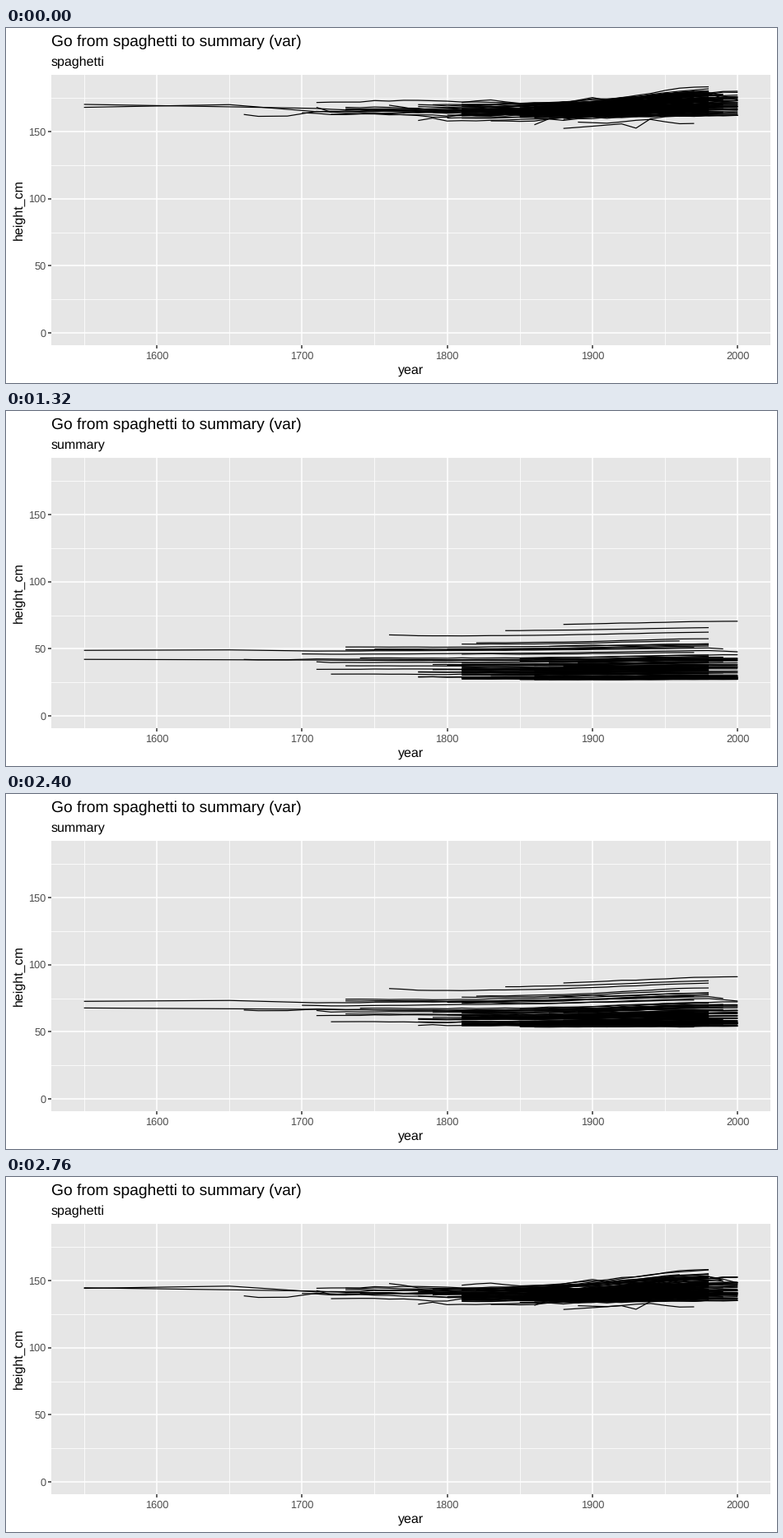
Animation of 936 by 432 pixels, one loop 2880 ms. Source, as a matplotlib script:

```python
import numpy as np
import matplotlib.pyplot as plt
from matplotlib.animation import FuncAnimation
from matplotlib.collections import LineCollection

W, H, DPI = 936, 432, 72          # at 72 dpi one point is one pixel
LEFT, RIGHT, TOP, BOTTOM = 55, 928, 57, 386
STEP_MS, FRAMES = 120, 24
HOLD, STEPS = 6, 6                # last still frame, steps per transition

plt.rcParams.update({
    "font.family": "Liberation Sans",
    "text.hinting": "none",
    "path.simplify": False,
})
rng = np.random.default_rng(12)

# start year, end year, variance, first height, last height
TRENDS = [
    (1880, 2000, 50, 159, 173),
    (1840, 1980, 43.5, 163.6, 177),
    (1810, 1960, 31.2, 165, 179),
    (1730, 1980, 28.4, 166, 180),
    (1750, 1980, 26.6, 166, 179),
    (1730, 1970, 25.5, 168, 178),
    (1740, 1980, 18.8, 165, 178),
    (1730, 1980, 11.4, 167, 173),
    (1720, 1990, 4.8, 162.8, 168),
    (1830, 1980, 3.6, 157.9, 164),
]

# variance, then (year, height) knots
TALL = [
    (38.5, (1760, 169.6), (1780, 165.8), (1810, 165), (1980, 181.8)),
    (32.3, (1820, 165), (1900, 171), (1960, 182.3), (1980, 183.3)),
    (28.3, (1870, 169), (1900, 175.3), (1910, 173.2), (1980, 180.3)),
    (20.9, (1810, 171.6), (1830, 173.5), (1850, 171), (1970, 179)),
    (7.3, (1710, 171.6), (1780, 173.2), (1850, 170.8), (1980, 174)),
]
LONG = [
    (25, (1550, 168), (1650, 170), (1710, 164.8), (1980, 178.5),
     (1990, 174.5)),
    (16.5, (1550, 170.2), (1650, 168.4), (1780, 165), (2000, 175)),
    (22.6, (1700, 164), (1720, 162.6), (1980, 179), (2000, 173.4)),
    (17.9, (1660, 162.7), (1670, 161.3), (1690, 161.5), (1710, 165),
     (1800, 161.5), (1990, 173)),
    (14.8, (1710, 168), (1720, 164.5), (2000, 174)),
]
LOW = [
    (3, (1780, 158.2), (1790, 160), (1800, 157.8), (1980, 165)),
    (14, (1860, 155), (1870, 159.4), (1980, 168)),
    (9, (1880, 152.3), (1920, 155.7), (1930, 152.5), (1940, 159.5),
     (1980, 163)),
    (2.4, (1890, 157), (1910, 156.2), (1940, 159), (1960, 155.8),
     (1970, 156)),
]


def growth(year):
    return 1 / (1 + np.exp((1925 - year) / 28))


def trend(start, end, var, first, last):
    """Heights by decade: flat at first, then rising through the 1900s."""
    year = np.arange(start, end + 1, 10)
    g = growth(year)
    rise = (g - g[0]) / (g[-1] - g[0])
    taper = np.sin(np.pi * (year - start) / (end - start)).clip(0) ** 0.5
    noise = rng.normal(0, 0.55, len(year))
    dip = 1.5 * np.exp(-((year - 1800) / 25) ** 2) * (start < 1790)
    return year, first + (last - first) * rise + taper * (noise - dip), var


def warp(year):
    return year + 300 * growth(year)


def knotted(var, *knots):
    year, height = np.array(knots, float).T
    wide = np.arange(1710, 2001, 10)
    inner = wide[(wide > year[0]) & (wide < year[-1])]
    grid = np.union1d(year, inner)
    wobble = rng.normal(0, 0.25, len(grid)) * ~np.isin(grid, year)
    return grid, np.interp(warp(grid), warp(year), height) + wobble, var


def drift(start, end, var):
    """A random country whose rise agrees with its variance."""
    first = np.clip(rng.normal(164.7, 2.6), 160, 170)
    sign = 1 if rng.random() < 0.87 else -0.4
    last = np.clip(first + sign * np.sqrt(11 * var), 162, 180)
    return trend(start, end, var, first, last)


def bulk(count):
    starts = [1810, 1850, 1870, 1890]
    for _ in range(count):
        start = rng.choice(starts, p=[.22, .38, .26, .14])
        start += 10 * rng.integers(0, 2) * (start > 1810)
        end = rng.choice([1970, 1980, 1990, 2000], p=[.07, .53, .07, .33])
        yield drift(start, end, 0.3 + 19 * rng.random() ** 3)


series = [trend(*t) for t in TRENDS]
series += [knotted(*k) for k in TALL + LONG + LOW]
series += [drift(1780 + 10 * (k // 3), 1980 + 10 * (k % 3 == 0), v)
           for k, v in enumerate([1, 5.4, 6.5, 16.7, 11.9, 8.2, 12.8, 27.9])]
series += list(bulk(112))

fig = plt.figure(figsize=(W / DPI, H / DPI), dpi=DPI, facecolor="white")
ax = fig.add_axes([LEFT / W, 1 - BOTTOM / H,
                   (RIGHT - LEFT) / W, (BOTTOM - TOP) / H])
ax.set(xlim=(1527.5, 2022.5), ylim=(-9.15, 192.2), facecolor="#E6E6E6")
ax.spines[:].set_visible(False)
ax.set_axisbelow(True)
ax.set_xticks(range(1600, 2001, 100))
ax.set_yticks(range(0, 151, 50))
ax.set_xticks(range(1550, 2000, 100), minor=True)
ax.set_yticks(range(25, 180, 50), minor=True)
ax.tick_params(length=4, width=1.5, color="#333333",
               labelbottom=False, labelleft=False)
ax.tick_params(which="minor", length=0)
ax.grid(which="minor", color="white", lw=0.8)
ax.grid(which="major", color="white", lw=1.55)


def label(x, y, text, size, color="black", **kw):
    """Text with its baseline at a pixel position counted from the top."""
    return fig.text(x / W, 1 - y / H, text, size=size, color=color,
                    va="baseline", **kw)


label(55, 22.3, "Go from spaghetti to summary (var)", 19.2)
subtitle = label(55, 46, "spaghetti", 16)
label(491.5, 420.8, "year", 16, ha="center")
label(19.6, 221.5, "height_cm", 16, ha="center", rotation=90,
      rotation_mode="anchor")

for year in range(1600, 2001, 100):
    x = LEFT + (year - 1527.5) * (RIGHT - LEFT) / 495
    label(x, 403, str(year), 12.8, "#4D4D4D", ha="center")
for cm in range(0, 151, 50):
    y = BOTTOM - (cm + 9.15) * (BOTTOM - TOP) / 201.35
    label(48.3, y + 4.6, str(cm), 12.8, "#4D4D4D", ha="right")

lines = LineCollection([], colors="black", linewidths=1.2, zorder=3)
ax.add_collection(lines, autolim=False)


def blend(i):
    """0 shows the raw series, 1 the flat variances."""
    half = FRAMES // 2
    part = max(0, i % half - HOLD) / STEPS
    return part if i < half else 1 - part


def draw(i):
    m = blend(i)
    lines.set_segments([np.column_stack((year, height * (1 - m) + var * m))
                        for year, height, var in series])
    flat = HOLD + STEPS // 2 < i <= FRAMES // 2 + HOLD + STEPS // 2
    subtitle.set_text("summary" if flat else "spaghetti")
    return lines, subtitle


anim = FuncAnimation(fig, draw, frames=FRAMES, interval=STEP_MS,
                     init_func=lambda: draw(0), repeat=True, repeat_delay=0)
plt.show()
```
